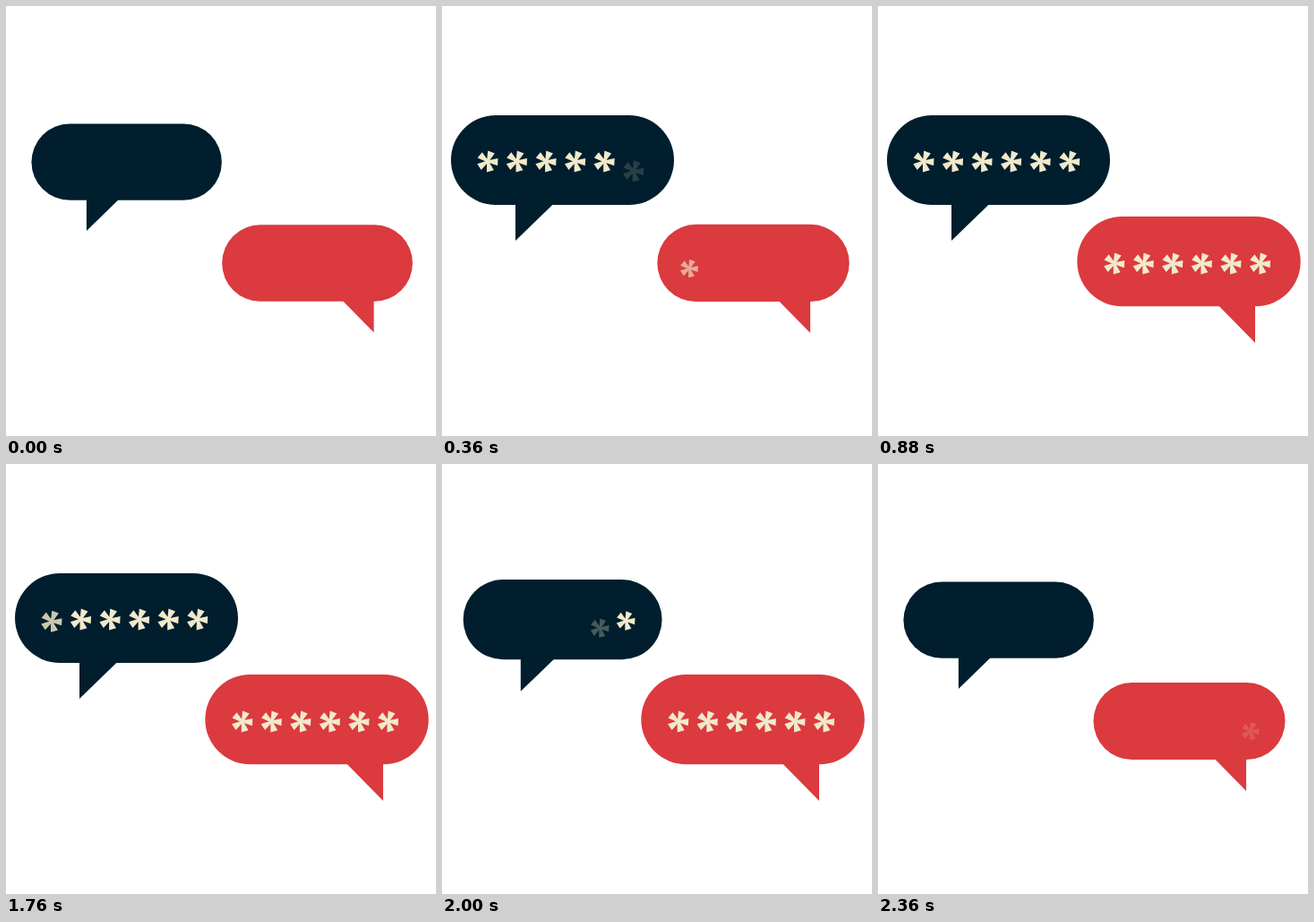
Write an HTML page that moves like this. It is 480 px wide and 480 px high and loops after 2400 ms.

```html
<!DOCTYPE html>
<html lang="en">
<head>
<meta charset="utf-8">
<title>Chat bubbles</title>
<style>
  html, body { margin: 0; width: 100%; height: 100%; overflow: hidden; background: #fff; }
  svg { display: block; width: 100%; height: 100%; }
</style>
</head>
<body>
<svg id="stage" viewBox="0 0 480 480"></svg>
<script>
const LOOP = 2400, STEP = 40;
const COUNT = 6, GAP = 32.55, DROP = 13, SMALL = 0.853;
const OUT_AT = 1720, REPLY_DELAY = 280;
const stage = document.getElementById('stage');

const clamp = v => Math.min(1, Math.max(0, v));
const smooth = v => { const u = clamp(v); return u * u * (3 - 2 * u); };

// Cubic bezier (x1, 0, x2, 1), solved by bisection
function bezier(x1, x2, v) {
  const x = clamp(v);
  let lo = 0, hi = 1;
  for (let i = 0; i < 24; i++) {
    const s = (lo + hi) / 2, r = 1 - s;
    if (3 * r * r * s * x1 + 3 * r * s * s * x2 + s * s * s < x) lo = s;
    else hi = s;
  }
  return smooth((lo + hi) / 2);
}

function add(parent, tag, attrs) {
  const el = document.createElementNS('http://www.w3.org/2000/svg', tag);
  for (const key in attrs) el.setAttribute(key, attrs[key]);
  return parent.appendChild(el);
}

// Five wedges that widen outwards, one pointing right
function starPath() {
  let d = '';
  for (let i = 0; i < 5; i++) {
    const a = (3 + 72 * i) * Math.PI / 180, c = Math.cos(a), s = Math.sin(a);
    const at = (r, w) => (r * c - w * s).toFixed(2) + ' ' + (r * s + w * c).toFixed(2);
    d += `M${at(-0.5, -0.9)}L${at(11.3, -4.1)}L${at(11.3, 4.1)}L${at(-0.5, 0.9)}Z`;
  }
  return d;
}

function makeBubble({ x, y, w, h, fill, tail, origin, starX, starY, delay }) {
  const group = add(stage, 'g', {});
  add(group, 'rect', { x, y, width: w, height: h, rx: h / 2, fill });
  add(group, 'path', { d: tail, fill });
  const stars = Array.from({ length: COUNT }, () =>
    add(group, 'path', { d: starPath(), fill: '#f1e9cb' }));
  return { group, stars, origin, starX, starY, delay };
}

const bubbles = [
  makeBubble({
    x: 10, y: 122, w: 249, h: 100, fill: '#001e2d',
    tail: 'M82 220V262L123.3 222V220Z',
    origin: [135.5, 187], starX: 51, starY: 173.5, delay: 0
  }),
  makeBubble({
    x: 222.3, y: 235, w: 249.4, h: 100.3, fill: '#db3a3f',
    tail: 'M421 333V376L380.7 335V333Z',
    origin: [350.5, 298], starX: 263.8, starY: 287.5, delay: REPLY_DELAY
  })
];

function drawBubble(b, time) {
  const t = time - b.delay;
  const size = smooth((t - 40) / 315) - smooth((t - OUT_AT - 40) / 360);
  const scale = SMALL + (1 - SMALL) * size;
  const [ox, oy] = b.origin;
  b.group.setAttribute('transform',
    `translate(${ox} ${oy}) scale(${scale}) translate(${-ox} ${-oy})`);

  const shown = bezier(0.25, 0.29, t / 600) * COUNT;
  const gone = smooth((t - OUT_AT) / 400) * COUNT;
  b.stars.forEach((star, i) => {
    const alpha = clamp(shown - i) - clamp(gone - i);
    star.setAttribute('opacity', alpha);
    star.setAttribute('transform',
      `translate(${b.starX + GAP * i} ${b.starY + DROP * (1 - alpha)})`);
  });
}

function render(ms) {
  const time = Math.floor((ms % LOOP) / STEP) * STEP;
  bubbles.forEach(b => drawBubble(b, time));
}

const start = performance.now();
function tick() {
  render(performance.now() - start);
  requestAnimationFrame(tick);
}
tick();
</script>
</body>
</html>
```
